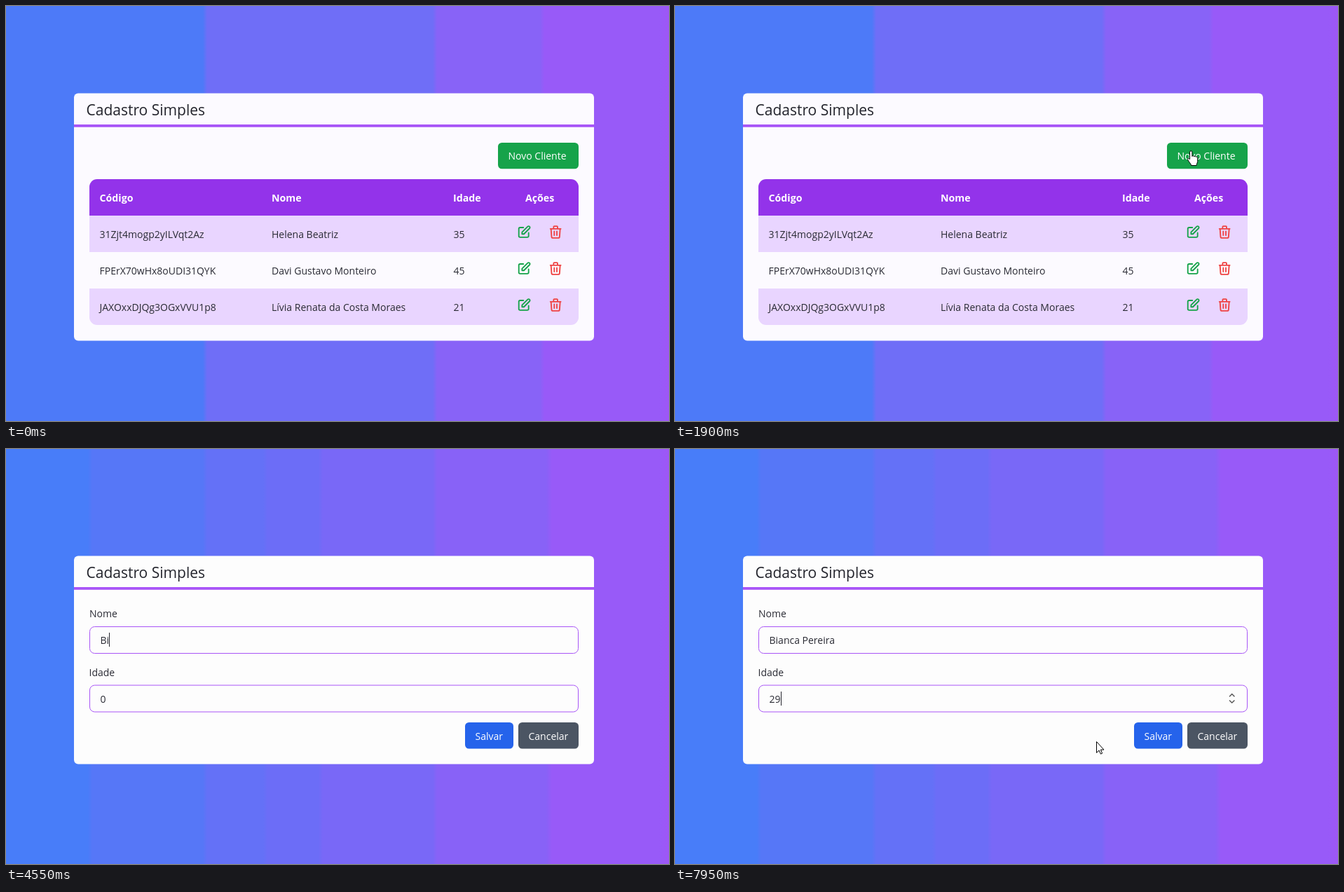
An HTML page that plays this animation: 946 by 592 pixels, repeating every 8000 ms.

```html
<!DOCTYPE html>
<html lang="pt-BR">
<head>
<meta charset="utf-8">
<title>Cadastro Simples</title>
<style>
  html, body { margin: 0; width: 100%; height: 100%; overflow: hidden; }
  body {
    background: linear-gradient(90deg, #4d7af8 281px, #6f6ef7 287px 609px,
      #8863f7 615px 762px, #985af8 768px 932px, #9e57f6 946px);
  }
  body.editing {
    background: linear-gradient(90deg, #487df9 117px, #5677f7 123px 281px,
      #6471f7 287px 367px, #6c6df7 373px 446px, #7968f7 452px 609px,
      #8862f7 615px 771px, #985af8 779px 932px, #9e57f6 946px);
  }
  svg { display: block; width: 946px; height: 592px; }
  text { font: 14px "Open Sans", "Noto Sans", sans-serif; fill: #2a2b34; white-space: pre; }
  .title { font-size: 21px; fill: #23242c; }
  .head text { font-weight: 700; font-size: 14.2px; fill: #fff; }
  .button text { fill: #fff; }
  .field { fill: #fdfdfd; stroke: #a855f7; }
  .icon { fill: none; stroke-width: 2; stroke-linecap: round; stroke-linejoin: round; }
  .pointer { fill: #fff; stroke: #000; stroke-linejoin: round; }
  .hidden { display: none; }
</style>
</head>
<body>
<svg viewBox="0 0 946 592">
  <defs>
    <path id="edit" class="icon" stroke="#16a34a" d="M11 5H6a2 2 0 0 0-2 2v11a2 2 0 0 0 2 2h11a2 2 0 0 0 2-2v-5m-1.414-9.414a2 2 0 1 1 2.828 2.828L11.828 15H9v-2.828l8.586-8.586z"/>
    <path id="trash" class="icon" stroke="#ef4444" d="M19 7l-.867 12.142A2 2 0 0 1 16.138 21H7.862a2 2 0 0 1-1.995-1.858L5 7m5 4v6m4-6v6m1-10V4a1 1 0 0 0-1-1h-4a1 1 0 0 0-1 1v3M4 7h16"/>
    <clipPath id="tableShape"><rect x="119" y="247" width="698" height="208" rx="11"/></clipPath>
  </defs>

  <g id="list">
    <rect x="97" y="124.5" width="742" height="353" rx="6" fill="#fcfaff"/>
    <rect x="97" y="169" width="742" height="3.8" fill="#a855f7"/>
    <text class="title" x="114.5" y="156">Cadastro Simples</text>
    <g class="button">
      <rect x="702" y="195" width="115" height="37.3" rx="5.5" fill="#16a34a"/>
      <text x="716.5" y="219.3" font-size="14.2">Novo Cliente</text>
    </g>
    <g id="rows" clip-path="url(#tableShape)">
      <rect x="119" y="247" width="698" height="52" fill="#9333ea"/>
      <g class="head">
        <text x="133.5" y="279">Código</text>
        <text x="379" y="279">Nome</text>
        <text x="638" y="279">Idade</text>
        <text x="741" y="279">Ações</text>
      </g>
    </g>
  </g>

  <g id="form">
    <rect x="97" y="152.5" width="742" height="297" rx="6" fill="#fdfdfd"/>
    <rect x="97" y="197" width="742" height="3.8" fill="#a855f7"/>
    <text class="title" x="114.5" y="184">Cadastro Simples</text>
    <text x="119" y="240">Nome</text>
    <rect class="field" x="119.5" y="253.5" width="697" height="38" rx="7"/>
    <text id="name" x="134.5" y="277.7"></text>
    <text x="118.5" y="323.5">Idade</text>
    <rect class="field" x="119.5" y="337" width="697" height="38" rx="7"/>
    <rect id="selection" x="135" y="346" width="8" height="20" fill="#0078d7"/>
    <text id="age" x="134.5" y="361.5"></text>
    <path id="spinner" d="M791 353.2l3.7-3.7 3.7 3.7M791 358.4l3.7 3.7 3.7-3.7" fill="none" stroke="#555" stroke-width="1.4"/>
    <rect id="caret" width="1" height="20" fill="#22232b"/>
    <g class="button">
      <rect x="655" y="390" width="69" height="37.5" rx="5.5" fill="#2563eb"/>
      <text x="669.5" y="414.5">Salvar</text>
      <rect x="731" y="390" width="86" height="37.5" rx="5.5" fill="#4b5563"/>
      <text x="745.5" y="414.5">Cancelar</text>
    </g>
  </g>

  <g id="cursor">
    <path id="arrow" class="pointer" d="M.5.5V16.3L4.1 12.9 6.4 18.1 8.6 17.1 6.4 12H11Z"/>
    <path id="hand" class="pointer" transform="translate(-4 .5)" d="M3.5 12V2a1.7 1.7 0 0 1 3.4 0V8a1.5 1.5 0 0 1 2.8.4 1.5 1.5 0 0 1 2.6.5 1.4 1.4 0 0 1 2.4 1V15c0 2-1.4 3-1.7 6H5.6C5.4 18.5 2 16 .7 12.8c-.5-1.5 1-2.4 2-1.4Z"/>
    <path id="beam" d="M-3-8h2.5l.5.5.5-.5H3M0-7.5V7.5M-3 8h2.5l.5-.5.5.5H3" fill="none" stroke="#222"/>
  </g>
</svg>
<script>
  const LOOP = 8000, STEP = 50;
  const $ = id => document.getElementById(id);
  const show = (id, on) => $(id).classList.toggle('hidden', !on);
  const within = (v, a, b) => v >= a && v < b;

  const clients = [
    ['31Zjt4mogp2yILVqt2Az', 'Helena Beatriz', 35],
    ['FPErX70wHx8oUDI31QYK', 'Davi Gustavo Monteiro', 45],
    ['JAXOxxDJQg3OGxVVU1p8', 'Lívia Renata da Costa Moraes', 21]
  ];
  $('rows').innerHTML += clients.map((cells, i) => {
    const y = 299 + 52 * i;
    const texts = cells.map((c, k) => `<text x="${[133.5, 379, 638.5][k]}" y="${y + 32}">${c}</text>`);
    const icon = (name, x) => `<use href="#${name}" transform="translate(${x} ${y + 12.3}) scale(.93)"/>`;
    return `<rect x="119" y="${y}" width="698" height="52" fill="${i % 2 ? '#fcfaff' : '#e9d5ff'}"/>`
      + texts.join('') + icon('edit', 728) + icon('trash', 773);
  }).join('');

  const fullName = 'Bianca Pereira';
  const keyTimes = [4400, 4550, 4650, 4750, 4900, 4950, 5050, 5250, 5350, 5550, 5650, 5750, 5850, 6000];
  const caretTimes = [[3050, 3500], [3900, 4300], [4400, 6100], [6900, 7300], [7450, LOOP]];

  // Pointer stops: time, x, y
  const enter = [[200, 30, 0], [800, 570, 251], [1000, 632, 268], [1800, 731, 208], [1900, 735, 206],
    [2250, 735, 206], [2800, 470, 272], [3050, 470, 272]];
  const reenter = [[7550, 480, 312], [7950, 601, 417], [LOOP, 601, 417]];

  function pointAt(path, t) {
    const i = path.findIndex((p, k) => k && t <= p[0]);
    const [a, b] = [path[i - 1], path[i]];
    const u = (t - a[0]) / (b[0] - a[0]);
    const k = u * (2 - u);
    return [a[1] + (b[1] - a[1]) * k, a[2] + (b[2] - a[2]) * k];
  }

  function drawCursor(t, editing) {
    const path = within(t, 200, 3050) ? enter : t >= 7550 ? reenter : null;
    show('cursor', path);
    if (!path) return;
    const [x, y] = pointAt(path, t).map(Math.round);
    const hand = !editing && within(x, 702, 817) && within(y, 195, 232);
    const beam = editing && within(x, 119, 817) && (within(y, 253, 292) || within(y, 337, 376));
    $('cursor').setAttribute('transform', `translate(${x} ${y})`);
    show('hand', hand);
    show('beam', beam);
    show('arrow', !hand && !beam);
  }

  function drawForm(t) {
    const onAge = t >= 6100, selected = within(t, 6100, 6900);
    $('name').textContent = fullName.slice(0, keyTimes.filter(k => k <= t).length);
    $('age').textContent = t < 6900 ? '0' : t < 7450 ? '2' : '29';
    $('age').style.fill = selected ? '#fff' : '';
    show('selection', selected);
    show('spinner', onAge);
    show('caret', caretTimes.some(([a, b]) => within(t, a, b)));
    const field = $(onAge ? 'age' : 'name');
    const width = field.textContent ? field.getComputedTextLength() : 0;
    $('caret').setAttribute('x', Math.round(134.6 + width));
    $('caret').setAttribute('y', onAge ? 346 : 262);
  }

  function render(now) {
    const t = Math.floor(now % LOOP / STEP) * STEP;
    const editing = t >= 2250;
    document.body.classList.toggle('editing', editing);
    show('list', !editing);
    show('form', editing);
    if (editing) drawForm(t);
    drawCursor(t, editing);
  }

  const start = performance.now();
  function tick() {
    render(performance.now() - start);
    requestAnimationFrame(tick);
  }
  tick();
</script>
</body>
</html>
```
